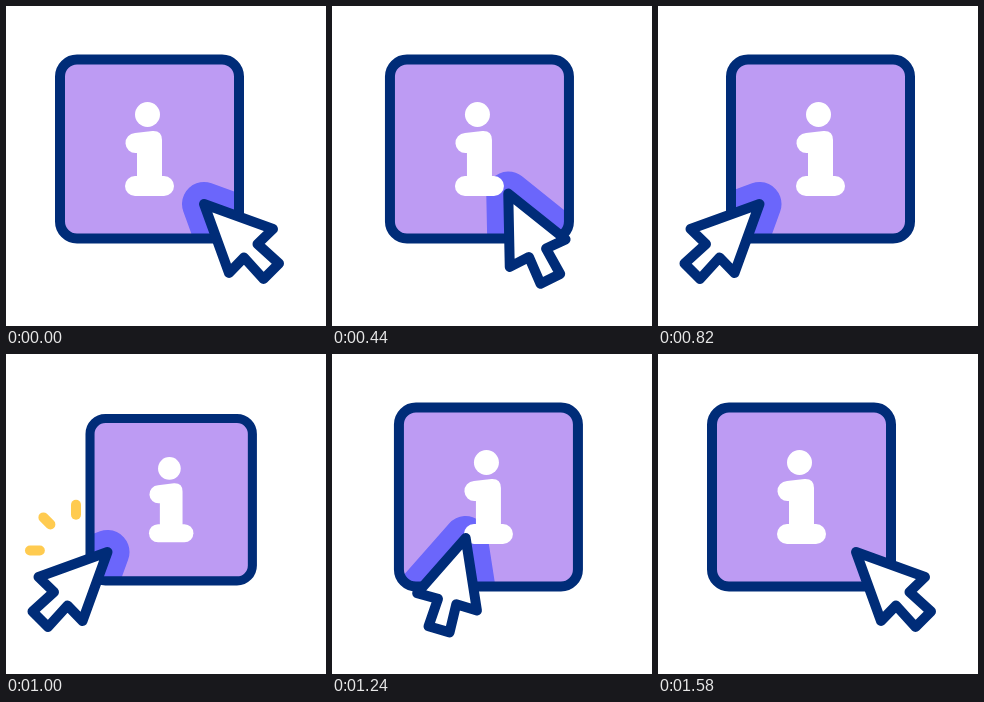
An HTML page with a canvas that plays this animation: 320x320 px, repeating every 1600 ms.

```html
<!DOCTYPE html>
<html lang="en">
<head>
<meta charset="utf-8">
<title>Info click</title>
<style>
html, body { margin: 0; height: 100%; overflow: hidden; background: #fff; }
canvas { display: block; }
</style>
</head>
<body>
<canvas id="stage" width="320" height="320"></canvas>
<script>
const ctx = document.getElementById('stage').getContext('2d');
const NAVY = '#002c78', PURPLE = '#bd9bf3', BLUE = '#6b66fb', YELLOW = '#ffcb50';
const LOOP = 1600;

// Shapes are relative to their own centres
const card = new Path2D();
card.roundRect(-89.5, -89.5, 179, 179, 17);
const pointer = new Path2D('M-39-39L30-14L14.5 1L36 20.5L20.5 36L1 14.5L-14 30Z');
const stem = new Path2D('M-12.5 4H-13.5A10 10 0 0 1-14.5-16L3-18Q12.5-18.5 12.5-9V37H-12.5Z');
const foot = new Path2D('M-14.5 37H14.5');
const dot = new Path2D();
dot.arc(-2, -34.5, 12.5, 0, 7);

// Each ray: start point and unit direction
const rays = [[244, 175.6, 0, -1], [264, 183, .707, -.707], [272.2, 203.5, 1, 0]];
const RAY_LENGTH = 22;

function ease(t, from, to) {
  const u = Math.min(1, Math.max(0, (t - from) / (to - from)));
  return u * u * (3 - 2 * u);
}

function stroke(path, color, width) {
  ctx.strokeStyle = color;
  ctx.lineWidth = width;
  ctx.stroke(path);
}

function fill(path, color) {
  ctx.fillStyle = color;
  ctx.fill(path);
}

function placed(place, paint) {
  ctx.save();
  place();
  paint();
  ctx.restore();
}

function drawRays(phase, leftSide) {
  const head = ease(phase, 100, 240) * RAY_LENGTH;
  const tail = ease(phase, 140, 290) * RAY_LENGTH;
  if (head - tail < .1) return;
  placed(() => {
    if (leftSide) ctx.transform(-1, 0, 0, 1, 314, -7);
  }, () => {
    for (const [x, y, dx, dy] of rays) {
      const ray = new Path2D();
      ray.moveTo(x + dx * tail, y + dy * tail);
      ray.lineTo(x + dx * head, y + dy * head);
      stroke(ray, YELLOW, 10);
    }
  });
}

function draw(t) {
  const phase = t % (LOOP / 2);
  const shift = ease(t, 300, 780) - ease(t, 1060, 1540);
  const press = ease(phase, 40, 200) - ease(phase, 220, 360);

  const placeCard = () => {
    ctx.translate(143.5 + 19 * shift + 2.7 * press, 143 + 2.7 * press);
    ctx.scale(1 - .093 * press, 1 - .093 * press);
  };
  const placePointer = () => {
    ctx.translate(237 - 174.5 * shift, 237);
    ctx.rotate(shift * Math.PI / 2);
  };

  ctx.fillStyle = '#fff';
  ctx.fillRect(0, 0, 320, 320);
  ctx.lineCap = ctx.lineJoin = 'round';

  placed(placeCard, () => fill(card, PURPLE));
  if (t < 1570) {
    const clip = new Path2D();
    placed(placeCard, () => clip.addPath(card, ctx.getTransform()));
    placed(() => { ctx.clip(clip); placePointer(); }, () => {
      fill(pointer, BLUE);
      stroke(pointer, BLUE, 44);
    });
  }
  placed(placeCard, () => {
    stroke(card, NAVY, 10);
    fill(dot, '#fff');
    fill(stem, '#fff');
    stroke(foot, '#fff', 20);
  });
  drawRays(phase, t >= LOOP / 2);
  placed(placePointer, () => {
    fill(pointer, '#fff');
    stroke(pointer, NAVY, 10);
  });
}

function tick() {
  draw(performance.now() % LOOP);
  requestAnimationFrame(tick);
}
tick();
</script>
</body>
</html>
```
